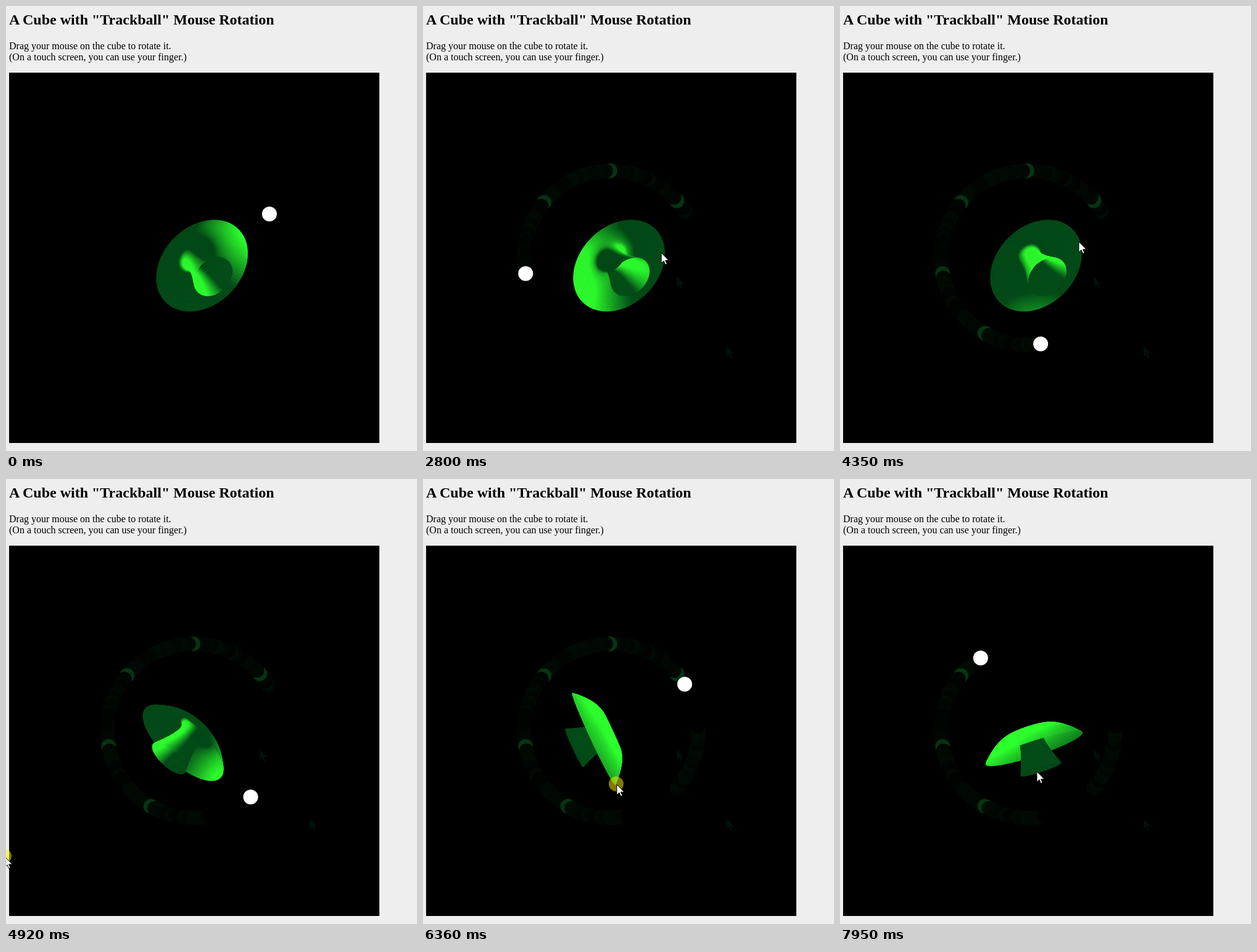
An HTML page with a canvas that plays this animation: 666 px wide and 721 px high, repeating every 8000 ms.

```html
<!DOCTYPE html>
<html lang="en">
<head>
<meta charset="utf-8">
<title>Trackball</title>
<style>
html, body { margin: 0; width: 100%; height: 100%; overflow: hidden; background: #eee; }
body { position: relative; font: 16px/18px "Liberation Serif", "Times New Roman", serif; color: #000; }
h2, p { position: absolute; left: 5px; margin: 0; white-space: nowrap; }
h2 { top: 8px; font-size: 24px; line-height: 28px; }
p { top: 56px; }
canvas { position: absolute; left: 0; top: 0; }
</style>
</head>
<body>
<h2>A Cube with "Trackball" Mouse Rotation</h2>
<p>Drag your mouse on the cube to rotate it.<br>(On a touch screen, you can use your finger.)</p>
<canvas id="stage" width="666" height="721"></canvas>
<script>
const ctx = document.getElementById('stage').getContext('2d');
const LOOP = 8000, STEP = 51.35;
const CX = 305, CY = 408, ORBIT = 141, BALL = 12, EYE = 1500;
const SIDES = 90, CUTS = 20;

// Direction of the foot: right, down, towards the viewer
const FACING = [.453, .453, .768], SIDEWAYS = [-.915, .4, -.04], UPRIGHT = [.31, .935, .17];
const TURNS = [
  { start: 4420, end: 5226, to: SIDEWAYS },
  { start: 6345, end: 6640, to: UPRIGHT }
];

// Pointer stops: time, x, y
const STOPS = [
  [1600, 615, 722], [2300, 386, 403], [4400, 387, 382], [4915, -2, 612],
  [5740, 110, 545], [6352, 314, 495], [6600, 530, 530], [7400, 566, 498], [7944, 319, 474]
];

const clamp = k => Math.min(1, Math.max(0, k));
const smooth = k => k * k * (3 - 2 * k);
const mix = (a, b, k) => a.map((v, i) => v + (b[i] - v) * k);
const dot = (a, b) => a[0] * b[0] + a[1] * b[1] + a[2] * b[2];
const unit = a => { const l = Math.hypot(...a); return a.map(v => v / l); };
const cross = (a, b) => [a[1] * b[2] - a[2] * b[1], a[2] * b[0] - a[0] * b[2], a[0] * b[1] - a[1] * b[0]];

// Profile of the surface, [distance along axis, radius]: rim (-1) to ridge (0) to foot (1)
function profile(q) {
  return q < 0
    ? [-1 + 32 * Math.pow(-q, 1.8), 31 - 51 * q]
    : [-1 + 67 * q * q, 31 - 49 * q + 52 * q * q];
}

const rings = Array.from({ length: 2 * CUTS + 1 }, (_, i) => profile(i / CUTS - 1));

function axisAt(t) {
  return TURNS.reduce((a, { start, end, to }) => mix(a, to, clamp((t - start) / (end - start))), FACING);
}

function pointerAt(t) {
  const i = Math.max(1, STOPS.findIndex(s => s[0] >= t));
  const [t0, ...a] = STOPS[i - 1], [t1, ...b] = STOPS[i];
  return mix(a, b, smooth(clamp((t - t0) / (t1 - t0))));
}

function ballAt(t) {
  const a = (30.2 + 0.05702 * t) * Math.PI / 180;
  return [ORBIT * Math.cos(a), -ORBIT * Math.sin(a), 0];
}

const stepTime = n => Math.min(STOPS[STOPS.length - 1][0], Math.max(0, n * STEP - 15));

function disc(x, y, r, fill) {
  ctx.fillStyle = fill;
  ctx.beginPath();
  ctx.arc(x, y, r, 0, 2 * Math.PI);
  ctx.fill();
}

// Faint marks left along the orbit; the second round wipes them out
function drawTrail(n) {
  for (let i = 0; i < n; i++) {
    const [x, y] = ballAt(stepTime(i));
    const noise = Math.abs(Math.sin(i * 12.9898) * 43758.5453) % 1;
    const first = i < 86, marked = first || (i > 98 && i < 114);
    const g = first && i % 17 === 4 ? 52 : marked ? 3 + 8 * noise : 0;
    disc(CX + x, CY + y, BALL, `rgb(${g * .1},${g},${g * .36})`);
  }
}

function drawSurface(axis, light) {
  const u = unit(cross(axis, [0, 0, 1])), v = cross(axis, u);
  const dirs = Array.from({ length: 2 * SIDES + 1 }, (_, j) => {
    const a = j * Math.PI / SIDES;
    return u.map((q, i) => q * Math.cos(a) + v[i] * Math.sin(a));
  });
  const place = (h, r, d) => axis.map((q, i) => q * h + d[i] * r);
  const grid = rings.map(([h, r]) => dirs.map(d => place(h, r, d)));
  const lamp = light.map(q => 2 * q);
  const quads = [];
  for (let i = 1; i < rings.length; i++) {
    const [h0, r0] = rings[i - 1], [h1, r1] = rings[i];
    const len = Math.hypot(h1 - h0, r1 - r0);
    for (let j = 0; j < 2 * SIDES; j += 2) {
      const mid = place((h0 + h1) / 2, (r0 + r1) / 2, dirs[j + 1]);
      const normal = place((r1 - r0) / len, (h0 - h1) / len, dirs[j + 1]);
      quads.push({
        z: mid[2],
        glow: clamp(1.5 * dot(normal, unit(lamp.map((q, k) => q - mid[k])))),
        pts: [grid[i - 1][j], grid[i - 1][j + 2], grid[i][j + 2], grid[i][j]]
      });
    }
  }
  quads.sort((a, b) => a.z - b.z);
  ctx.lineWidth = .5;
  ctx.lineJoin = 'round';
  for (const { glow, pts } of quads) {
    ctx.fillStyle = ctx.strokeStyle = `rgb(${4 + 42 * glow},${76 + 179 * glow},${25 + 21 * glow})`;
    ctx.beginPath();
    for (const [x, y, z] of pts) {
      const k = EYE / (EYE - z);
      ctx.lineTo(CX + x * k, CY + y * k);
    }
    ctx.closePath();
    ctx.fill();
    ctx.stroke();
  }
}

const arrow = new Path2D('M0 0V17L4 13.2L6.6 19.3L9.2 18.2L6.6 12.2H12Z');

function drawArrow([x, y], fill, line) {
  ctx.save();
  ctx.translate(x, y);
  ctx.fillStyle = fill;
  ctx.fill(arrow);
  if (line) {
    ctx.strokeStyle = line;
    ctx.lineWidth = 1;
    ctx.stroke(arrow);
  }
  ctx.restore();
}

function draw(n) {
  const t = stepTime(n), light = ballAt(t);
  ctx.clearRect(0, 0, 666, 721);
  ctx.fillStyle = '#000';
  ctx.fillRect(5, 108, 600, 600);
  drawTrail(n);
  for (const s of [1967, 2155])
    if (t > s) drawArrow(pointerAt(s), '#01100a');
  drawSurface(unit(axisAt(t)), light);
  disc(CX + light[0], CY + light[1], BALL, '#fff');
  if (t < STOPS[0][0]) return;
  const tip = pointerAt(t);
  if (TURNS.some(({ start, end }) => t >= start && t < end))
    disc(tip[0] - 1, tip[1] - 1, 12, 'rgba(255,240,0,.5)');
  drawArrow(tip, '#fff', '#000');
}

let shown = -1;
function tick() {
  const n = Math.floor((performance.now() % LOOP + 25) / STEP);
  if (n !== shown) draw(shown = n);
  requestAnimationFrame(tick);
}
tick();
</script>
</body>
</html>
```
